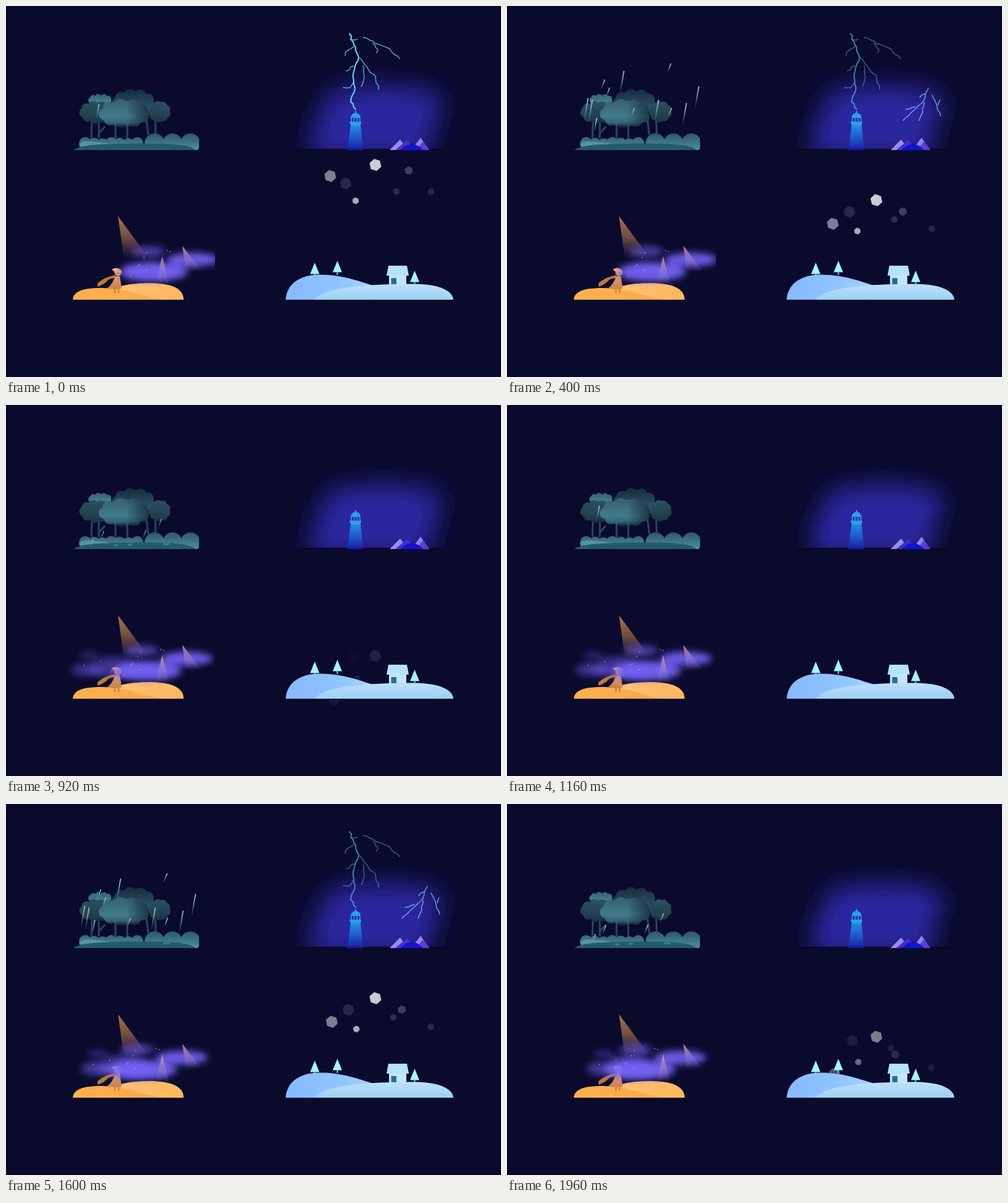
An HTML page for the animation above (2 s loop, 800 by 600 pixels).

```html
<!DOCTYPE html>
<html lang="en">
<head>
<meta charset="utf-8">
<title>Four weathers</title>
<style>
html, body { margin: 0; width: 100%; height: 100%; overflow: hidden; background: #0a0a2d; }
svg { display: block; width: 800px; height: 600px; }
.bolt { fill: none; stroke-linejoin: round; stroke-linecap: round; }
</style>
</head>
<body>
<svg viewBox="0 0 800 600">
  <defs>
    <filter id="glow" x="-50%" y="-80%" width="200%" height="260%"><feGaussianBlur stdDeviation="19"/></filter>
    <filter id="haze" x="-30%" y="-60%" width="160%" height="220%"><feGaussianBlur stdDeviation="5.5"/></filter>
    <clipPath id="sky"><path d="M440 70H760V231H440Z"/></clipPath>
    <clipPath id="wood"><path d="M105 120H312V233H105Z"/></clipPath>
    <clipPath id="desert"><path d="M85 330H338V476H85Z"/></clipPath>
    <linearGradient id="leafFront" x2="0" y2="1">
      <stop stop-color="#365f70"/><stop offset=".6" stop-color="#417b8a"/>
      <stop offset=".8" stop-color="#356675"/><stop offset="1" stop-color="#356675" stop-opacity="0"/>
    </linearGradient>
    <linearGradient id="shade">
      <stop offset=".55" stop-color="#14263a" stop-opacity="0"/><stop offset="1" stop-color="#14263a" stop-opacity=".8"/>
    </linearGradient>
    <linearGradient id="leafBack" x2="0" y2="1">
      <stop stop-color="#182a3f"/><stop offset=".8" stop-color="#2d5767"/><stop offset="1" stop-color="#2d5767" stop-opacity="0"/>
    </linearGradient>
    <linearGradient id="leafSide" x2="0" y2="1">
      <stop stop-color="#2b5161"/><stop offset=".7" stop-color="#21404f"/><stop offset="1" stop-color="#1a3042"/>
    </linearGradient>
    <linearGradient id="bush" gradientUnits="userSpaceOnUse" x1="0" y1="205" x2="0" y2="233">
      <stop stop-color="#295565"/><stop offset="1" stop-color="#4f8fa1"/>
    </linearGradient>
    <linearGradient id="drop" x2="0" y2="1">
      <stop stop-color="#9bd0df"/><stop offset=".4" stop-color="#719db1"/><stop offset="1" stop-color="#5a8aa0" stop-opacity="0"/>
    </linearGradient>
    <linearGradient id="tower" x2="0" y2="1">
      <stop stop-color="#238fe6"/><stop offset=".5" stop-color="#1f5acb"/><stop offset="1" stop-color="#1a1ca3"/>
    </linearGradient>
    <linearGradient id="spire" x2="0" y2="1">
      <stop stop-color="#a8764c"/><stop offset=".5" stop-color="#6c4a3f"/><stop offset="1" stop-color="#4b3149" stop-opacity="0"/>
    </linearGradient>
    <linearGradient id="pink" x2="0" y2="1">
      <stop stop-color="#c596a4"/><stop offset="1" stop-color="#8470ce" stop-opacity="0"/>
    </linearGradient>
    <linearGradient id="dune"><stop stop-color="#ffb04c"/><stop offset="1" stop-color="#f6aa51"/></linearGradient>
    <linearGradient id="duneFar"><stop stop-color="#ffc57a"/><stop offset="1" stop-color="#ffb75d"/></linearGradient>
    <linearGradient id="coat" x2="0" y2="1"><stop stop-color="#dd9a70"/><stop offset="1" stop-color="#c98349"/></linearGradient>
    <linearGradient id="hillBack"><stop stop-color="#87b9ff"/><stop offset=".5" stop-color="#8fc4ff"/><stop offset="1" stop-color="#b6dcff"/></linearGradient>
    <linearGradient id="hillFront" x2="0" y2="1"><stop stop-color="#bde0fb"/><stop offset="1" stop-color="#9bd1f1"/></linearGradient>
  </defs>

  <!-- wood -->
  <path d="M150 180V214M150 206L160 195M177 185V215M196 185V217M226 176L230 209M241 180L242 208M139 180L138 213" fill="none" stroke="#25495a" stroke-width="3"/>
  <g id="leaves"></g>
  <g clip-path="url(#wood)">
    <g id="bushes" fill="url(#bush)"></g>
    <path d="M119 226Q120 218 132 219Q165 220 180 227Z" fill="#66a3b6" opacity=".6"/>
    <path d="M109 233Q118 226 150 224Q210 221 260 223Q300 225 306 233Z" fill="#245b6b"/>
  </g>
  <g id="ripples" fill="#2f8490"></g>
  <g id="rain" stroke="url(#drop)" stroke-width="1.7" fill="none"></g>

  <!-- lighthouse -->
  <g clip-path="url(#sky)">
    <path d="M525 138Q610 118 692 138Q716 156 694 186L682 245H492Q492 195 512 160Z" fill="#2b279f" filter="url(#glow)"/>
  </g>
  <path d="M468 232H716" stroke="#070722" stroke-width="2" opacity=".7"/>
  <path d="M557 192H573L577 233H552Z" fill="url(#tower)"/>
  <path d="M550 230H578V233H550Z" fill="#1919a5"/>
  <g fill="#28a0f0">
    <path d="M555 187H574V190L572 193H558L556 190Z"/>
    <path d="M557 181Q558 173 565 173Q572 173 573 181Z"/>
    <path d="M564 170H566V174H564Z"/>
    <path d="M558 180V188M562.5 180V188M567.5 180V188M572 180V188" stroke="#28a0f0" stroke-width="1.6"/>
  </g>
  <path d="M620 233L637 216L650 233Z" fill="#9c8de9"/>
  <path d="M655 233L670 213L684 233Z" fill="#9182ec"/>
  <path d="M662 233L674 219L684 233Z" fill="#5541d5"/>
  <path d="M629 233L648 217L664 233Z" fill="#452fce"/>
  <path d="M637 233Q646 224 655 223Q667 224 674 233Z" fill="#1514c9"/>
  <g id="boltA" class="bolt" stroke="#69dcff"></g>
  <g id="boltB" class="bolt" stroke="#7fbdfa"></g>

  <!-- desert -->
  <path d="M181 340L191 411L228 404Z" fill="url(#spire)"/>
  <g id="cloudL"></g>
  <path d="M150 475C163 453 200 448 235 448C268 449 287 457 287 475Z" fill="url(#duneFar)"/>
  <path d="M108 475C109 461 125 456 155 456C195 456 215 469 254 475Z" fill="url(#dune)"/>
  <path d="M176 457V464M182 457V464" stroke="#b4703d" stroke-width="1.6"/>
  <path d="M176 437H184L187 457Q176 460 164 456Q173 449 176 437Z" fill="url(#coat)"/>
  <path d="M177 435Q160 438 148 448V454Q160 450 165 443Q170 440 177 440Z" fill="#b97a3c"/>
  <circle cx="181" cy="431" r="5.8" fill="#dc9b6c"/>
  <path d="M171 426Q177 422 183 425Q188 427 187 432L180 430Q175 431 171 426Z" fill="#f5b070"/>
  <g clip-path="url(#desert)"><g id="cloudR"></g></g>
  <path d="M285 388L291 429L315 427Z" fill="url(#pink)"/>
  <path d="M252.500 405L241 450H264Z" fill="url(#pink)"/>

  <!-- snow -->
  <g id="snow" fill="#f1f0f5"></g>
  <path d="M452 475C454 447 478 435 505 434.500C545 434 575 447 593 452L625 475Z" fill="url(#hillBack)"/>
  <path d="M499 475C512 454 590 449.500 660 449.500C702 450 722 461 723 475Z" fill="url(#hillFront)"/>
  <path d="M619 435H647V450H619Z" fill="#c3e6ff"/>
  <path d="M618 420H648L651 436H615Z" fill="#b5e2ff"/>
  <path d="M622.500 440H631V450H622.500Z" fill="#21709d"/>
  <g id="firs" fill="#a2f6fb"></g>
</svg>
<script>
const NS = 'http://www.w3.org/2000/svg';
const $ = id => document.getElementById(id);
const add = (parent, tag, attrs) => {
  const el = document.createElementNS(NS, tag);
  for (const k in attrs) el.setAttribute(k, attrs[k]);
  return parent.appendChild(el);
};
const ellipse = (parent, cx, cy, rx, ry, opacity = 1) =>
  add(parent, 'ellipse', { cx, cy, rx, ry, opacity });
const clamp = v => Math.max(0, Math.min(1, v));
const ramp = (t, a, b) => clamp((t - a) / (b - a));
const fade = (el, v) => el.setAttribute('opacity', v);

let seed = 7;
const random = () => (seed = seed * 16807 % 2147483647) / 2147483647;

// A crown is discs around an ellipse in one path, so they share a gradient.
function crown(fill, cx, cy, rx, ry, r) {
  const disc = (x, y, a, b) => `M${x - a} ${y}a${a} ${b} 0 1 1 ${2 * a} 0a${a} ${b} 0 1 1 ${-2 * a} 0`;
  let d = disc(cx, cy, rx - 1, ry - 1);
  for (let i = 0; i < 9; i++) {
    const a = i * 2 * Math.PI / 9 + .3;
    d += disc(cx + (rx - r * .8) * Math.cos(a), cy + (ry - r * .8) * Math.sin(a), r, r);
  }
  add($('leaves'), 'path', { d, fill: `url(#${fill})` });
}
crown('leafBack', 206, 156, 33, 20, 10);
crown('leafSide', 248, 171, 17, 16, 7);
crown('leafFront', 152, 152, 18, 9, 5);
crown('leafSide', 145, 172, 25, 17, 8);
crown('leafFront', 191, 174, 39, 22, 10);
crown('shade', 191, 174, 39, 22, 10);

for (let x = 128; x < 225; x += 14) ellipse($('bushes'), x, 223, 10, 9 + x % 3);
for (let x = 240; x < 310; x += 29) ellipse($('bushes'), x, 222, 16, 16);

const ripples = [[259, 225, 6], [178, 227, 4], [200, 226, 3.5]].map(([x, y, r]) => ellipse($('ripples'), x, y, r, 1.7));

// A wave of drops: where they are at time `at`, falling at one speed.
const drops = [];
const wave = (len, speed, at, from, to, points) => {
  for (const [x, y] of points) drops.push({ len, speed, at, from, to, x, y, el: add($('rain'), 'path', {}) });
};
wave(36, .13, 400, 190, 700, [[189, 105], [131, 149], [138, 152], [245, 152], [290, 157], [310, 130]]);
wave(15, .16, 400, 190, 700, [[158, 119], [166, 132], [206, 165], [265, 93], [266, 165]]);
wave(23, .055, 400, -80, 700, [[145, 181]]);
wave(15, .18, 880, 700, 980, [[253, 177], [160, 196], [143, 210], [228, 195]]);

function drawRain(p) {
  for (const d of drops) {
    const fall = (p - d.at) * d.speed;
    const slope = d.len < 20 ? .38 : .17;
    d.el.setAttribute('d', `M${d.x - fall * .24} ${d.y + fall}l${-d.len * slope} ${d.len}`);
    fade(d.el, ramp(p, d.from, d.from + 80) * (1 - ramp(p, d.to - 90, d.to)));
  }
  ripples.forEach((el, i) => fade(el, p >= (i ? 700 : 480) && p < 1000 ? 1 : 0));
}

// Flakes: radius, opacity, start point, point after 600 ms
const flakes = [
  [10, .84, 597, 257, 597, 348],
  [10, .5, 524, 275, 528, 398],
  [9.8, .13, 549, 287, 556, 360],
  [7, .23, 651, 266, 633, 372],
  [5.6, .7, 565, 315, 567, 393],
  [5.8, .15, 631, 300, 623, 372],
  [5.8, .13, 687, 300, 686, 396]
].map(([r, alpha, x, y, x1, y1]) => {
  const points = Array.from({ length: 6 }, (_, i) => {
    const a = (i * 60 - 102) * Math.PI / 180;
    return `${r * Math.cos(a)},${r * Math.sin(a)}`;
  }).join(' ');
  return { alpha, x, y, dx: x1 - x, dy: y1 - y, el: add($('snow'), 'polygon', { points }) };
});

function drawSnow(u) {
  const k = (u / 600) ** 1.15;
  const shown = 1 - ramp(u, 620, 960);
  for (const f of flakes) {
    f.el.setAttribute('transform', `translate(${f.x + f.dx * k} ${f.y + f.dy * k})`);
    fade(f.el, f.alpha * shown);
  }
}

// Joins key points with small random kinks.
function bolt(id, width, opacity, ...lines) {
  for (const line of lines) {
    const keys = line.split(' ').map(p => p.split(',').map(Number));
    let d = 'M' + keys[0];
    for (let i = 1; i < keys.length; i++) {
      const [x, y] = keys[i - 1];
      const dx = keys[i][0] - x, dy = keys[i][1] - y;
      const len = Math.hypot(dx, dy), n = Math.ceil(len / 6);
      for (let j = 1; j < n; j++) {
        const kink = (random() - .5) * 3.5 / len;
        d += `L${x + dx * j / n - dy * kink} ${y + dy * j / n + dx * kink}`;
      }
      d += 'L' + keys[i];
    }
    add($(id), 'path', { d, opacity, 'stroke-width': width });
  }
}
bolt('boltA', 2, 1, '555,45 562,62 570,83 561,110 564,132 557,155 565,167');
bolt('boltA', 1.5, .75, '562,66 552,72 548,80', '558,54 568,54', '577,51 593,57 620,69 636,85', '593,60 601,70 599,76',
  '570,83 586,103 597,113 602,135', '577,97 579,116 574,130', '562,97 550,105', '562,122 556,132 545,132');
bolt('boltB', 1.4, 1, '681,133 674,152 640,185', '660,163 645,167', '676,142 667,148', '674,156 672,172 666,185',
  '687,144 694,158 701,178', '700,152 697,160');

function drawBolts(u) {
  fade($('boltA'), u >= 480 ? 0 : u < 120 ? 1 : .56);
  fade($('boltB'), u < 280 || u >= 700 ? 0 : .85 - .45 * ramp(u, 400, 680));
}

function cloud(id, x, y, w, h, specks, puffs) {
  const soft = add($(id), 'g', { fill: '#7562f7', filter: 'url(#haze)' });
  for (const p of puffs) ellipse(soft, ...p);
  for (let i = 0; i < specks; i++)
    add($(id), 'circle', { cx: x + random() * w, cy: y + random() * h, r: .9, fill: '#d3aee6', opacity: .75 });
}
cloud('cloudR', 195, 392, 80, 45, 8,
  [[240, 430, 54, 15, .9], [230, 430, 48, 16, .5], [302, 410, 42, 11, .9], [230, 397, 27, 9, .55]]);
cloud('cloudL', 110, 412, 60, 20, 4,
  [[125, 428, 27, 11, .5], [168, 428, 44, 13, .55], [165, 411, 34, 5, .45], [125, 404, 15, 5, .4]]);

function drawClouds(t) {
  $('cloudR').setAttribute('transform', `translate(${-t * .0112} 0)`);
  $('cloudL').setAttribute('transform', `translate(${(t - 600) * .0225} 0)`);
  fade($('cloudL'), t < 480 ? 0 : .7 + .3 * ramp(t, 480, 1500));
}

for (const [x, y] of [[499, 415], [535.5, 412], [660.5, 428]]) {
  add($('firs'), 'path', { d: `M${x} ${y}l7.500 18.500h-15Z` });
  add($('firs'), 'path', { d: `M${x} ${y + 18.5}v4.500`, stroke: '#83cfe9', 'stroke-width': 2 });
}

const LOOP = 2000, STEP = 40, RAIN = 1080, STORM = 1200;
const start = performance.now();
function frame() {
  const t = Math.floor((performance.now() - start) % LOOP / STEP) * STEP;
  drawRain(t % RAIN);
  drawBolts(t % STORM);
  drawSnow(t % STORM);
  drawClouds(t);
  requestAnimationFrame(frame);
}
frame();
</script>
</body>
</html>
```
